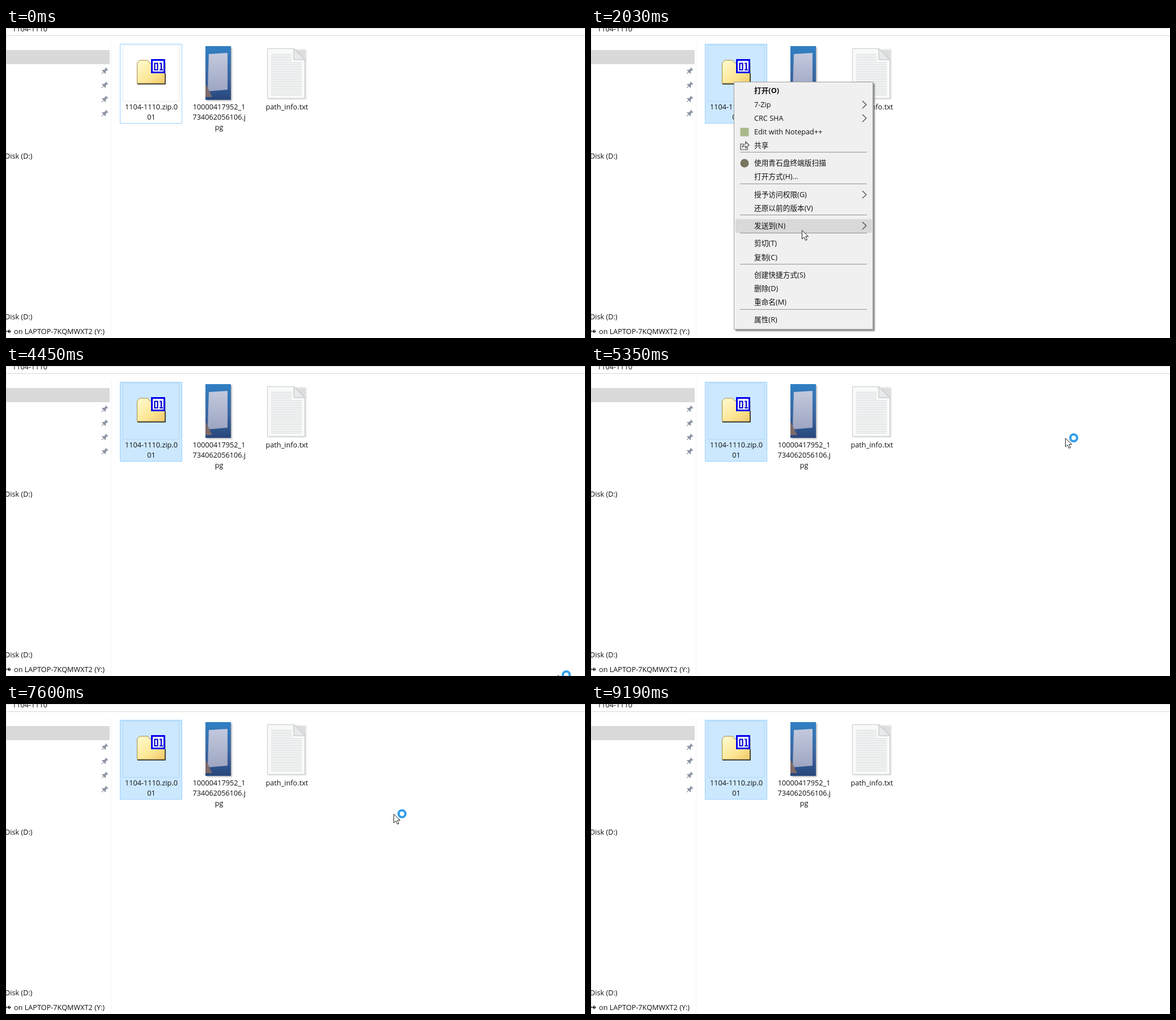
Recreate the animation shown at these times as an HTML page. Size 1022 px wide and 548 px high, loop 9230 ms.

```html
<!DOCTYPE html>
<html lang="zh-CN">
<head>
<meta charset="utf-8">
<style>
html, body { margin: 0; width: 100%; height: 100%; overflow: hidden; background: #fff; }
svg { display: block; }
text { font: 12.7px "Open Sans", "Noto Sans CJK SC", "Noto Sans CJK", sans-serif; fill: #111; white-space: pre; }
.mid { text-anchor: middle; }
.odd { font: 6.8px "DejaVu Sans", sans-serif; }
.panel { fill: #f0f0f0; stroke: #a0a0a0; }
.sep { stroke: #919191; }
.hot { fill: #d9d9d9; }
.line { fill: none; stroke: #444; stroke-width: 1.2; }
</style>
</head>
<body>
<svg width="1022" height="548" viewBox="0 0 1022 548">
  <defs>
    <linearGradient id="gold" x2="1" y2="1">
      <stop stop-color="#fffbd2"/><stop offset=".6" stop-color="#fce694"/><stop offset="1" stop-color="#efc766"/>
    </linearGradient>
    <linearGradient id="photo" x2="0" y2="1">
      <stop stop-color="#2f80c4"/><stop offset=".6" stop-color="#3c649f"/><stop offset="1" stop-color="#27477c"/>
    </linearGradient>
    <linearGradient id="paper" x2="0" y2="1">
      <stop stop-color="#c3c9dd"/><stop offset="1" stop-color="#9da5c2"/>
    </linearGradient>
    <filter id="soft" x="-5%" y="-5%" width="112%" height="112%"><feGaussianBlur stdDeviation="1"/></filter>
  </defs>

  <path d="M0 .5H1022" stroke="#e4e4e4"/>
  <path d="M0 13.500H1022" stroke="#d6d6d6"/>
  <path d="M.5 0V548" stroke="#e8e8e8"/>
  <path d="M185.500 24V548" stroke="#f3f3f3"/>
  <rect y="39" width="183" height="25" fill="#d9d9d9"/>
  <g id="pins" fill="#8c93a5"></g>
  <text x="11" y="6">1104-1110</text>
  <text x="-2" y="231">Disk (D:)</text>
  <text x="-2" y="515">Disk (D:)</text>
  <text class="odd" x="-5" y="539">��</text>
  <text x="14" y="541">on LAPTOP-7KQMWXT2 (Y:)</text>

  <rect id="file" x="201.500" y="28.500" width="109" height="140" stroke="#99d1ff"/>
  <rect id="thumb" x="206.500" y="30.500" width="99" height="99" fill="none"/>
  <path d="M231.500 98V62L236 57H250L254 62H281V98Z" fill="url(#gold)" stroke="#a98a3c"/>
  <path d="M232 99H281V80" fill="none" stroke="#222" stroke-width="1.500"/>
  <rect x="257.500" y="56.500" width="22" height="22" fill="#fff" stroke="#00e" stroke-width="3"/>
  <path d="M262.500 62.500H267.500V74H262.500ZM271 62.500H274V74M271 74H277" fill="none" stroke="#00c" stroke-width="2.200"/>

  <rect x="354" y="34" width="45" height="95" fill="#bbb" filter="url(#soft)"/>
  <rect x="352" y="32" width="45" height="95" fill="url(#photo)"/>
  <path d="M358 46L391 44V109L356 112Z" fill="url(#paper)"/>
  <path d="M352 98L364 122H352Z" fill="#7d6a68"/>

  <rect x="463" y="38" width="67" height="88" fill="#ddd" filter="url(#soft)"/>
  <path d="M461.500 36.500H508L527.500 56V124.500H461.500Z" fill="#f8f9f9" stroke="#c6cacc"/>
  <path d="M508 36.500V56H527.500Z" fill="#e6eaeb" stroke="#b8bdbf"/>
  <path id="ruled" stroke="#d2d6d8"/>

  <g id="names"></g>
  <g id="menu"></g>
  <g id="sub"></g>

  <g id="cursor">
    <path d="M.5.700V16L4.200 12.600L6.700 18.400L9.300 17.300L6.800 11.600H11.700Z" fill="#fff" stroke="#222" stroke-linejoin="round"/>
    <circle id="busy" cx="15" cy="0" r="6" fill="#fff" stroke="#319eee" stroke-width="4"/>
  </g>
</svg>
<script>
const $ = id => document.getElementById(id);
const LOOP = 9230, SELECT = 1000, MENU = 1300, SUBMENU = 2440, CLICK = 3120;
const ROW = 24.1, GAP = 7.25;

for (let i = 0; i < 4; i++)
  $('pins').innerHTML += `<path transform="translate(174 ${76 + 25 * i}) rotate(45)"
    d="M-3-6H3V-4.500H2V-1L4.500 1.500V2.500H.6V7H-.6V2.500H-4.500V1.500L-2-1V-4.500H-3Z"/>`;

let ruled = '';
for (let y = 46.5; y < 119; y += 3) ruled += `M468 ${y}H${y < 59 ? 504 : 522}`;
$('ruled').setAttribute('d', ruled);

[['1104-1110.zip.0', '01'], ['10000417952_1', '734062056106.j', 'pg'], ['path_info.txt']]
  .forEach((lines, i) => lines.forEach((s, n) => {
    $('names').innerHTML += `<text class="mid" x="${256.5 + 119.7 * i}" y="${144 + 18 * n}">${s}</text>`;
  }));

// Icons are drawn around their own centre
const box = (w, h, fill, more = '') =>
  `<rect x="${-w / 2}" y="${-h / 2}" width="${w}" height="${h}" fill="${fill}" ${more}/>`;
const disc = fill => `<circle r="7.5" fill="${fill}"/>`;
const icons = {
  editor: box(15, 15, '#a9b98b'),
  share: '<path class="line" d="M-2-3H-7V7H5V3M-4 3Q-3-3 2-3V-7L8-1L2 4V1Q-2 0-4 3Z"/>',
  scan: disc('#77745f'),
  mailer: disc('#c9301c'),
  fax: box(9, 14, '#fff', 'stroke="#59636e"') + box(15, 6, '#c8ced6', 'stroke="#59636e"'),
  wireless: disc('#0a84e8'),
  zip: box(13, 16, '#f2d26b') + box(3, 16, '#a08a4c'),
  mail: box(16, 11, '#fff', 'stroke="#a8b0b8"') + box(7, 1, '#8b96a5'),
  desk: box(16, 12, '#1086dc', 'stroke="#065d9d"'),
  drive: box(14, 6, '#444b50') + '<path d="M0 1V5M-6 5H6" stroke="#555" stroke-width="2"/>'
};

// Groups of [label, icon]; a trailing > in the label gives an arrow
const odd = n => `<tspan class="odd">${'�'.repeat(n)}</tspan>`;
const commands = [
  [['打开(O)'], ['7-Zip>'], ['CRC SHA>'], ['Edit with Notepad++', 'editor'], ['共享', 'share']],
  [['使用青石盘终端版扫描', 'scan'], ['打开方式(H)...']],
  [['授予访问权限(G)>'], ['还原以前的版本(V)']],
  [['发送到(N)>']],
  [['剪切(T)'], ['复制(C)']],
  [['创建快捷方式(S)'], ['删除(D)'], ['重命名(M)']],
  [['属性(R)']]
];
const targets = [[
  ['Lunpost', 'mailer'], ['传真收件人', 'fax'], ['蓝牙设备', 'wireless'],
  ['压缩(zipped)文件夹', 'zip'], ['邮件收件人', 'mail'], ['桌面快捷方式', 'desk'],
  [`01_${odd(7)}洫${odd(2)} on LAPTOP-7KQMWXT2 (Y:)`, 'drive']
]];

// Draws a menu and returns the centre of each row
function panel(id, x, y, w, h, groups) {
  const centres = [];
  let cy = y + 16.4;
  let s = `<rect x="${x + 3}" y="${y + 3}" width="${w}" height="${h}" fill="#777" opacity=".8" filter="url(#soft)"/>
    <rect class="panel" x="${x + .5}" y="${y + .5}" width="${w - 1}" height="${h - 1}"/>
    <rect class="hot" x="${x + 3}" width="${w - 5}" height="24"/>`;
  groups.forEach((group, g) => {
    if (g) {
      s += `<path class="sep" d="M${x + 11} ${Math.floor(cy - (ROW + GAP) / 2 + GAP / 2 + 8) - 8 + .5 - GAP / 2 + GAP / 2}H${x + w - 11}"/>`
        .replace(/ [\d.]+H/, ` ${Math.floor(cy - ROW / 2) + .5}H`);
      cy += GAP;
    }
    for (const [label, icon] of group) {
      const mid = Math.round(cy), arrow = label.endsWith('>') && !label.endsWith('n>');
      const weight = centres.length || id !== 'menu' ? 400 : 700;
      s += `<text x="${x + 36}" y="${mid + 4}" font-weight="${weight}" style="font-weight:${weight}">${arrow ? label.slice(0, -1) : label}</text>`;
      if (icon) s += `<g transform="translate(${x + 19} ${mid})">${icons[icon]}</g>`;
      if (arrow) s += `<path class="line" d="M479 ${mid - 7}l7 6.500l-7 6.500"/>`;
      centres.push(mid);
      cy += ROW;
    }
  });
  $(id).innerHTML = s;
  return centres;
}
const menuRows = panel('menu', 252, 95, 246, 438, commands);
const subRows = panel('sub', 493, 335, 380, 178, targets);

// Pointer strokes: [ms, x, y]
const strokes = [
  [[30, 894, 527], [480, 20, 250], [930, 252, 95], [MENU, 252, 95], [1890, 372, 357],
   [SUBMENU, 372, 357], [2840, 534, 345], [CLICK, 534, 345], [3280, 1022, 92]],
  [[4430, 975, 548], [4560, 958, 524], [4700, 985, 548]],
  [[4900, 968, 548], [5350, 837, 127], [5850, 837, 110], [6560, 548, 384], [6920, 485, 277],
   [7300, 575, 66], [7480, 718, 172], [8000, 470, 330], [8230, 530, 205], [8400, 499, 241],
   [8660, 520, 242], [8960, 764, 330], [9190, 672, 352]]
];

function pointer(t) {
  const stroke = strokes.find(s => t >= s[0][0] && t < s[s.length - 1][0]);
  if (!stroke) return [-99, -99];
  const i = stroke.findIndex(p => t < p[0]), [t0, x0, y0] = stroke[i - 1], [t1, x1, y1] = stroke[i];
  const u = (t - t0) / (t1 - t0), e = u * u * (3 - 2 * u);
  return [x0 + (x1 - x0) * e, y0 + (y1 - y0) * e].map(Math.round);
}

const show = (el, on) => { el.style.display = on ? '' : 'none'; };

function highlight(id, centres, y) {
  const bar = $(id).querySelector('.hot'), row = centres.find(c => Math.abs(c - y) <= 12);
  show(bar, row);
  if (row) bar.setAttribute('y', row - 12);
}

function draw(t) {
  const [x, y] = pointer(t);
  $('cursor').setAttribute('transform', `translate(${x} ${y})`);
  show($('busy'), t >= CLICK);

  const chosen = t >= SELECT, over = x > 201 && x < 311 && y > 28 && y < 169;
  $('file').setAttribute('fill', chosen ? '#cce8ff' : over ? '#e5f3ff' : '#fff');
  $('thumb').setAttribute('stroke', chosen ? '#b4d9f3' : '#e4eaef');

  show($('menu'), t >= MENU && t < CLICK);
  show($('sub'), t >= SUBMENU && t < CLICK);
  highlight('menu', menuRows, t >= SUBMENU ? menuRows[9] : y);
  highlight('sub', subRows, x > 493 ? y : -99);
}

const start = performance.now();
function tick() {
  draw((performance.now() - start) % LOOP);
  requestAnimationFrame(tick);
}
tick();
</script>
</body>
</html>
```
